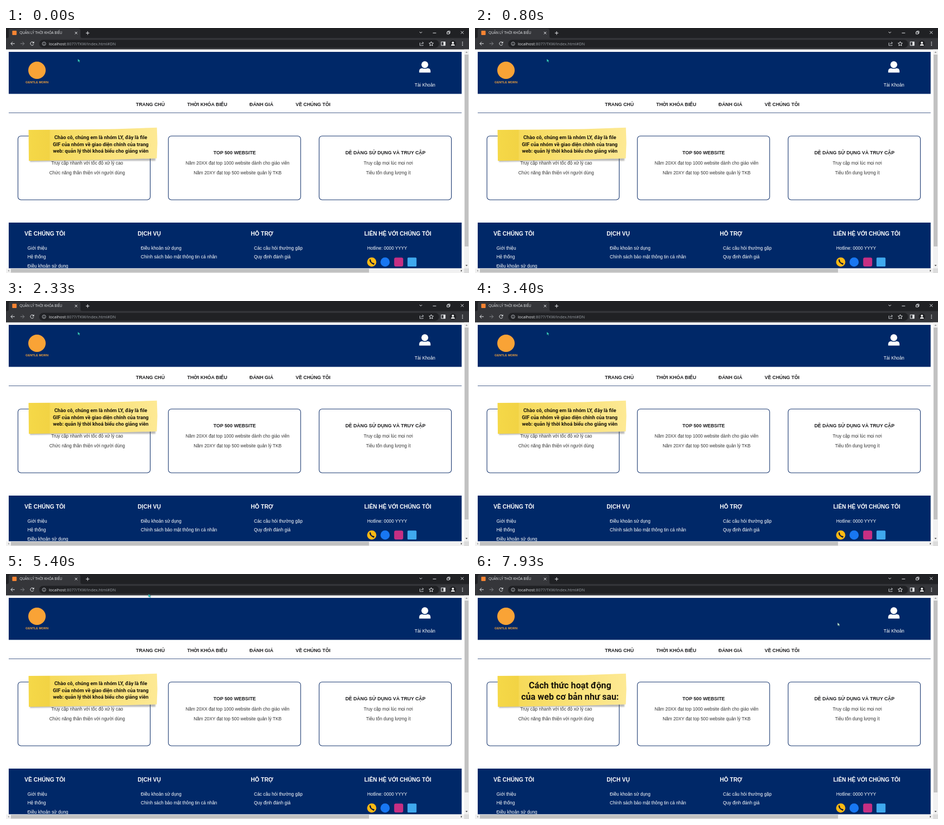
Animation of 852 by 452 pixels, one loop 8 s. Source, as an HTML page:

```html
<!DOCTYPE html>
<html lang="vi">
<head>
<meta charset="utf-8">
<title>Quản lý thời khóa biểu</title>
<style>
  html, body { margin: 0; width: 100%; height: 100%; overflow: hidden; background: #fff; }
  svg { display: block; width: 852px; height: 452px; }
  text { font-family: "Liberation Sans", Arial, sans-serif; }
  .ui { font-family: "Open Sans", "Noto Sans", sans-serif; }
  .note { font-family: Roboto, "Noto Sans", sans-serif; font-weight: 700; fill: #17130a; text-anchor: middle; }
  .mid { text-anchor: middle; }
  .bold { font-weight: 700; font-size: 8.875px; fill: #1c1c1e; }
  .body { font-size: 8.32px; fill: #333; }
  .head { font-weight: 700; font-size: 10.38px; fill: #fff; }
  .link { font-size: 8.32px; fill: #fff; }
  .line { fill: none; stroke: #e8eaed; stroke-width: 1; }
</style>
</head>
<body>
<svg viewBox="0 0 852 452">
  <defs>
    <linearGradient id="paper">
      <stop offset="0" stop-color="#f5d848"/>
      <stop offset=".16" stop-color="#f2d344"/>
      <stop offset=".17" stop-color="#f6da59"/>
      <stop offset=".6" stop-color="#fae27a"/>
      <stop offset="1" stop-color="#fde994"/>
    </linearGradient>
    <filter id="soft" x="-10%" y="-20%" width="120%" height="140%"><feGaussianBlur stdDeviation="1.3"/></filter>
    <clipPath id="view"><rect y="39" width="843" height="404.5"/></clipPath>
  </defs>

  <rect width="852" height="452" fill="#fff"/>

  <g id="page" clip-path="url(#view)">
    <rect x="5" y="44" width="833.5" height="77.5" fill="#002868"/>
    <rect x="5" y="359" width="833.5" height="90" fill="#002868"/>
    <path d="M5 156.5H838.5" stroke="#4d648f"/>
    <circle cx="57" cy="78" r="16" fill="#f9a336"/>
    <text x="57" y="102.4" class="mid" font-size="5.7" font-weight="700" fill="#f0a03c">GENTLE MORN</text>
    <circle cx="770.7" cy="67.6" r="6.3" fill="#fff"/>
    <path d="M760.4 82.2V79.5Q760.4 74.2 766 74.2Q770.7 76.4 775.4 74.2Q781.2 74.2 781.2 79.5V82.2Z" fill="#fff"/>
  </g>

  <g id="browser">
    <rect width="852" height="19" fill="#202124"/>
    <path d="M2 18.5Q5 18.5 5 15V5Q5 1 9 1H133Q137 1 137 5V15Q137 18.5 140 18.5H852V39.5H0V18.5Z" fill="#35363a"/>
    <rect x="61" y="21.8" width="736" height="14.6" rx="7.3" fill="#202124"/>
    <rect x="11.5" y="5" width="8" height="8" rx="1" fill="#f98432"/>
    <text x="25" y="11.4" class="ui" font-size="6.4" fill="#e8eaed">QUẢN LÝ THỜI KHÓA BIỂU</text>
    <text x="79" y="31.7" class="ui" font-size="7.4" fill="#e8eaed">localhost<tspan fill="#9aa0a6">:8077/TKW/index.html#DN</tspan></text>
    <path class="line" d="M126.8 7L131.2 11.4M131.2 7L126.8 11.4M147 9.3H153.4M150.2 6V12.6
      M761 7L763.3 9.3L765.6 7M785.5 9.2H791.5M811.5 7.3H815.6V11H811.5ZM813 7V5.8H817V9.8H815.8M837 5.8L842 10.8M842 5.8L837 10.8" stroke-width=".9"/>
    <path class="line" d="M16 28.8H9M12.2 25.5L8.9 28.8L12.2 32.1"/>
    <path class="line" d="M26.5 28.8H33.5M30.3 25.5L33.6 28.8L30.3 32.1" style="stroke:#85888c"/>
    <path class="line" d="M50.4 26.6A3.2 3.2 0 1 0 51 30"/>
    <path d="M51.6 24.8V28.2H48.2Z" fill="#e8eaed"/>
    <circle cx="70" cy="29" r="3.2" class="line" stroke-width=".8" style="stroke:#aeb2b7"/>
    <path d="M70 28.5V31M70 26.9V27.7" stroke="#aeb2b7" stroke-width=".9"/>
    <path class="line" d="M762.5 27.5H761.5V32.3H767.5V31M763.5 30.3Q764 27.6 768 27.6M766 25.6L768.4 27.6L766 29.6" stroke-width=".8" style="stroke:#b8bbc0"/>
    <path class="line" d="M782.5 25L783.7 27.7L786.5 28L784.4 29.9L785 32.8L782.5 31.3L780 32.8L780.6 29.9L778.5 28L781.3 27.7Z" stroke-width=".8"/>
    <rect x="801" y="25.7" width="7" height="6.4" class="line"/>
    <rect x="805" y="25.5" width="3.4" height="6.8" fill="#e8eaed"/>
    <circle cx="822.4" cy="29" r="6" fill="#202124"/>
    <circle cx="822.4" cy="27.2" r="1.9" fill="#fff"/>
    <path d="M818.8 32.4Q819 29.7 822.4 29.7Q825.8 29.7 826 32.4Z" fill="#fff"/>
    <path d="M839.3 25.4h1.5v1.5h-1.5zm0 2.8h1.5v1.5h-1.5zm0 2.8h1.5v1.5h-1.5z" fill="#e8eaed"/>
  </g>

  <g id="scrollbars">
    <path d="M843 39.5H852V452H0V443.5H843Z" fill="#f1f1f1"/>
    <rect x="843" y="443.5" width="9" height="8.5" fill="#dcdcdc"/>
    <path d="M844 49H851V403H844ZM9 444.3H668V451.3H9Z" fill="#c1c1c1"/>
    <path d="M845.5 45.8L847.5 43.4L849.5 45.8Z" fill="#8a8a8a"/>
    <path d="M845.5 437L847.5 439.4L849.5 437ZM837 445.8L839.4 447.8L837 449.8Z" fill="#505050"/>
    <path d="M5.8 445.8L3.4 447.8L5.8 449.8Z" fill="#a3a3a3"/>
  </g>

  <g id="note">
    <path d="M44 190L276 188L275 245L160 245L44 247Z" fill="#555" opacity=".4" filter="url(#soft)"/>
    <path d="M41.5 188L120 187.6L200 186.5L277.7 183.8L278.6 212L277.5 240.5L190 243L42 245Z" fill="url(#paper)"/>
    <g id="greeting" class="note" font-size="9.25"></g>
    <g id="intro" class="note" font-size="16.2"></g>
  </g>
  <path id="cursor" d="M0 0L.3 5.6L1.7 4.4L2.8 6.5L3.9 5.9L2.8 4L4.6 3.6Z" stroke="#173b4a" stroke-width=".35"/>
</svg>
<script>
const NS = "http://www.w3.org/2000/svg";
const $ = id => document.getElementById(id);
const page = $("page");

function add(parent, tag, attrs, content = "") {
  const el = document.createElementNS(NS, tag);
  for (const key in attrs) el.setAttribute(key, attrs[key]);
  el.textContent = content;
  parent.appendChild(el);
}
const write = (x, y, cls, content, parent = page) => add(parent, "text", { x, y, class: cls }, content);

[[239, "TRANG CHỦ"], [333.5, "THỜI KHÓA BIỂU"], [448, "ĐÁNH GIÁ"], [533, "VỀ CHÚNG TÔI"]]
  .forEach(([x, label]) => write(x, 143.5, "bold", label));
write(771, 107.6, "link mid", "Tài Khoản");

[
  [22, "", "Truy cập nhanh với tốc độ xử lý cao", "Chức năng thân thiện với người dùng"],
  [298.8, "TOP 500 WEBSITE", "Năm 20XX đạt top 1000 website dành cho giáo viên", "Năm 20XY đạt top 500 website quản lý TKB"],
  [576.2, "DỄ DÀNG SỬ DỤNG VÀ TRUY CẬP", "Truy cập mọi lúc mọi nơi", "Tiêu tốn dung lượng ít"]
].forEach(([x, title, ...lines]) => {
  add(page, "rect", { x, y: 199.2, width: 243.4, height: 117.8, rx: 5.5, fill: "#fff", stroke: "#17366f", "stroke-width": 1.1 });
  write(x + 122, 233.3, "bold mid", title);
  lines.forEach((line, i) => write(x + 127.3, 252.2 + 17.8 * i, "body mid", line));
});

[
  [34, "VỀ CHÚNG TÔI", "Giới thiệu", "Hệ thống", "Điều khoản sử dụng"],
  [242.3, "DỊCH VỤ", "Điều khoản sử dụng", "Chính sách bảo mật thông tin cá nhân"],
  [450.6, "HỖ TRỢ", "Các câu hỏi thường gặp", "Quy định đánh giá"],
  [659.2, "LIÊN HỆ VỚI CHÚNG TÔI", "Hotline: 0000 YYYY"]
].forEach(([x, title, ...links]) => {
  write(x, 382.6, "head", title);
  links.forEach((link, i) => write(x + 5.6, 408.7 + 16.7 * i, "link", link));
});

add(page, "circle", { cx: 673, cy: 431.8, r: 8.5, fill: "#fdb913" });
add(page, "path", { d: "M670.3 427.6Q669 432.2 676.4 435.6M669.8 428.2L671.2 430.4M674.5 434L677 435", fill: "none", stroke: "#111b3a", "stroke-width": 2, "stroke-linecap": "round" });
add(page, "circle", { cx: 697.6, cy: 431.8, r: 8.5, fill: "#1877f2" });
add(page, "rect", { x: 714.3, y: 423.5, width: 16.6, height: 16.6, rx: 3, fill: "#c62f83" });
add(page, "rect", { x: 738.8, y: 423.5, width: 16.6, height: 16.6, rx: 1.5, fill: "#3fa9ee" });

[
  "Chào cô, chúng em là nhóm LY, đây là file",
  "GIF của nhóm về giao diện chính của trang",
  "web: quản lý thời khoá biểu cho giảng viên"
].forEach((line, i) => write(174.3, 205.2 + 12.5 * i, "", line, $("greeting")));
["Cách thức hoạt động", "của web cơ bản như sau:"]
  .forEach((line, i) => write(174.8, 210.8 + 21.4 * i, "", line, $("intro")));
for (const line of document.querySelectorAll("#note text")) line.style.fontFamily = "inherit";

const LOOP = 8000, NOTE_CHANGE = 7000;
// time, x, y
const route = [
  [0, 132, 57], [4100, 132, 57], [4530, 158, 48], [5400, 261.8, 37],
  [6400, 500, 44], [7200, 640, 60], [7930, 667, 89.8], [LOOP, 667, 89.8]
];

function cursorAt(t) {
  const i = route.findIndex(stop => stop[0] > t);
  const [t0, x0, y0] = route[i - 1], [t1, x1, y1] = route[i];
  const p = (t - t0) / (t1 - t0);
  return [x0 + (x1 - x0) * p, y0 + (y1 - y0) * p];
}

function render(t) {
  const changed = t >= NOTE_CHANGE;
  $("greeting").style.display = changed ? "none" : "";
  $("intro").style.display = changed ? "" : "none";
  const [x, y] = cursorAt(t);
  $("cursor").setAttribute("transform", `translate(${x} ${y})`);
  $("cursor").setAttribute("fill", t < 5500 ? "#35cfc4" : "#c4ecd5");
}

const start = performance.now();
function tick() {
  render((performance.now() - start) % LOOP);
  requestAnimationFrame(tick);
}
tick();
</script>
</body>
</html>
```
